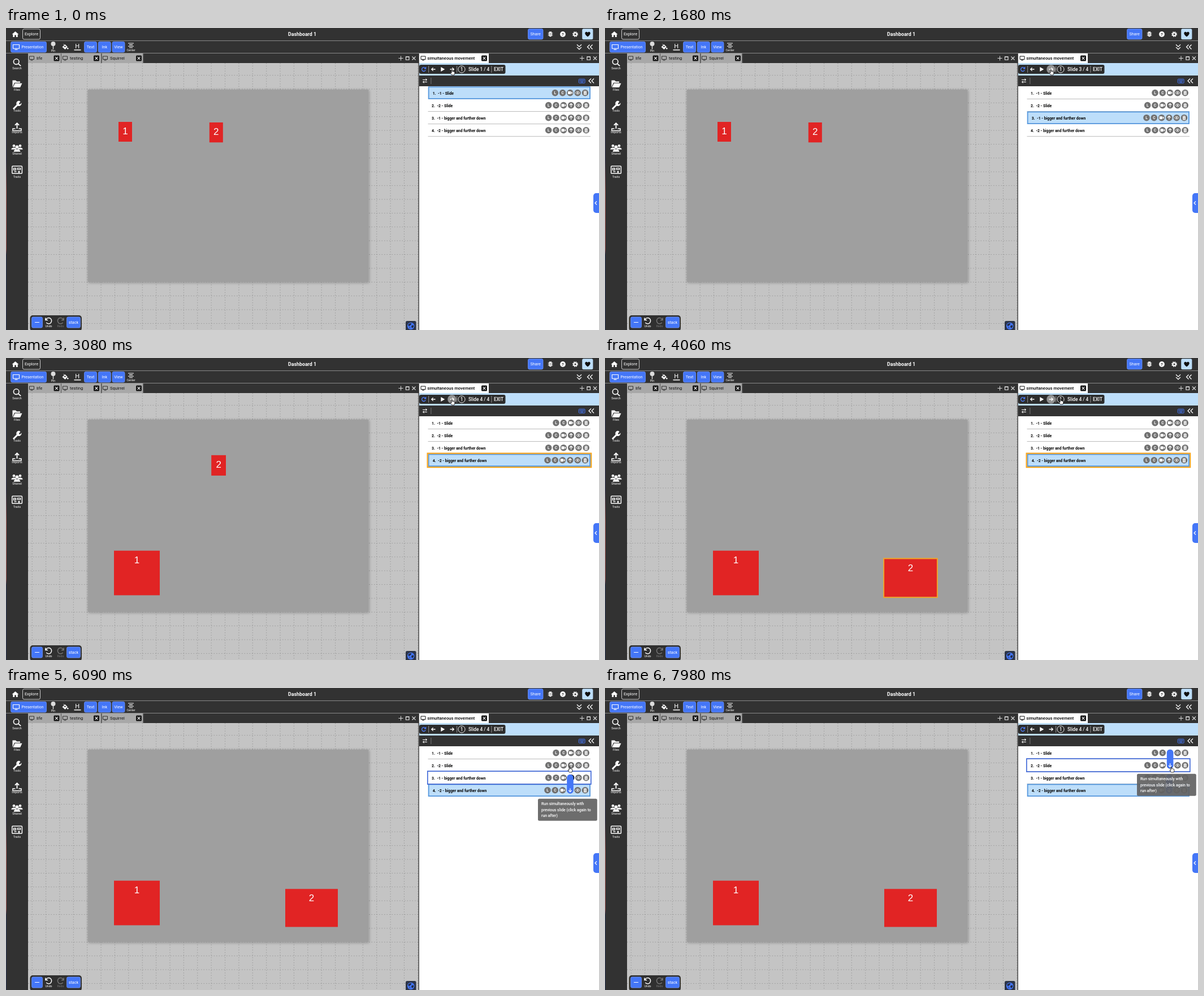
An HTML page that plays this animation: 1049 px wide and 534 px high, repeating every 8000 ms.

```html
<!DOCTYPE html>
<html lang="en">
<head>
<meta charset="utf-8">
<title>Dashboard</title>
<style>
  html, body { margin: 0; width: 100%; height: 100%; overflow: hidden; background: #fff; }
  svg { display: block; width: 100%; height: 100%; font-family: Roboto, sans-serif; }
</style>
</head>
<body>
<svg id="stage" viewBox="0 0 1049 534">
  <defs>
    <filter id="shadow" x="-5%" y="-5%" width="110%" height="112%">
      <feDropShadow dx="1" dy="1" stdDeviation="2.4" flood-opacity=".28"/>
    </filter>
    <linearGradient id="edge" x2="0" y2="1">
      <stop offset="0" stop-color="#27304a"/><stop offset=".41" stop-color="#3a3a55"/>
      <stop offset=".52" stop-color="#b06a68"/><stop offset=".72" stop-color="#a05a5a"/>
      <stop offset=".74" stop-color="#2a3550"/><stop offset="1" stop-color="#27304a"/>
    </linearGradient>
  </defs>
  <g id="fixed"></g>
  <g id="live"></g>
</svg>
<script>
const DARK = '#323232', BLUE = '#4476f7', PALE = '#bddefa', ORANGE = '#f7a51f', RED = '#e12424';
const LOOP = 8000, STEP = 70;

// ---- drawing helpers ----
const rect = (x, y, w, h, fill, r = 0, extra = '') =>
  `<rect x="${x}" y="${y}" width="${w}" height="${h}" rx="${r}" fill="${fill}" ${extra}/>`;
const frame = (x, y, w, h, stroke, sw, r = 0) => rect(x, y, w, h, 'none', r, `stroke="${stroke}" stroke-width="${sw}"`);
const circle = (x, y, r, fill, extra = '') => `<circle cx="${x}" cy="${y}" r="${r}" fill="${fill}" ${extra}/>`;
const text = (x, y, s, size, fill = '#fff', weight = 400, anchor = 'start') =>
  `<text x="${x}" y="${y}" font-size="${size}" fill="${fill}" font-weight="${weight}" text-anchor="${anchor}">${s}</text>`;
const mid = (x, y, s, size, fill, weight) => text(x, y, s, size, fill, weight, 'middle');
const solid = (x, y, d, fill = '#fff') => `<path transform="translate(${x} ${y})" d="${d}" fill="${fill}" fill-rule="evenodd"/>`;
const line = (x, y, d, stroke = '#fff', sw = 1.2) =>
  `<path transform="translate(${x} ${y})" d="${d}" fill="none" stroke="${stroke}" stroke-width="${sw}"/>`;
const button = (x, y, w, h, label) =>
  rect(x, y, w, h, BLUE, 2.5, 'stroke="#7397fb" stroke-width=".8"') + (label ? mid(x + w / 2, y + h / 2 + 2.6, label, 7.2) : '');

const ARROW_R = 'M-3.5 0H3.2M.4 -2.9L3.3 0L.4 2.9';
const ARROW_L = 'M3.5 0H-3.2M-.4 -2.9L-3.3 0L-.4 2.9';
const ARROW_U = 'M0 3.3V-2.9M-2.8 -.2L0 -3L2.8 -.2';
const ARROW_D = 'M0 -3.3V2.9M-2.8 .2L0 3L2.8 .2';
const CROSS = 'M-3 -3L3 3M3 -3L-3 3';
const SMALL_CROSS = 'M-2.3 -2.3L2.3 2.3M2.3 -2.3L-2.3 2.3';
const DOUBLE_LEFT = 'M-.5 -4L-4.5 0L-.5 4M4.5 -4L.5 0L4.5 4';
const MONITOR = 'M-4 -3.5H4V2H-4ZM-2 3.6H2';

const gear = (x, y) => circle(x, y, 2.6, 'none', 'stroke="#fff" stroke-width="2"') +
  circle(x, y, 4.2, 'none', 'stroke="#fff" stroke-width="1.4" stroke-dasharray="1.9 1.4"');
const tabTools = (x, y = 53.5) => line(x, y, 'M-4 0H4M0 -4V4', '#ddd', 1) +
  line(x + 11.7, y, 'M-2.8 -2.8H2.8V2.8H-2.8ZM-2.8 -2.2H2.8', '#eee', 1.1) + line(x + 23, y, CROSS, '#ddd', 1.1);
const closeBox = x => rect(x - 5, 48.5, 10, 10, '#161616', 1.5) + line(x, 53.5, SMALL_CROSS, '#fff', 1.1);

function header() {
  return rect(0, 0, 1049, 45, DARK) + rect(0, 22, 1049, 1, '#8a8a8a') + rect(0, 44, 1049, 1, '#8a8a8a') +
    solid(16.5, 11, 'M-6 .3L0 -5L6 .3H4.2V5H1.3V1.5H-1.3V5H-4.2V.3Z') +
    frame(29.5, 1.8, 31, 18.2, '#ddd', .9, 2.5) + mid(45, 13.4, 'Explore', 7.3) +
    mid(524, 14, 'Dashboard 1', 8.8, '#fff', 700) +
    button(923.5, 1.5, 26.5, 18.5, 'Share') +
    solid(963, 11, 'M-2.4 -2.4A2.4 2.4 0 0 1 2.4 -2.4V2A2.4 2.4 0 0 1 -2.4 2Z') +
    line(963, 11, 'M-4.2 -2.3H4.2M-4.2 0H4.2M-4.2 2.3H4.2M-2.3 -4.6L-1 -3.5M2.3 -4.6L1 -3.5', '#fff', .9) +
    line(963, 11, 'M-1.2 -1.2H1.2M-1.2 1.2H1.2', DARK, .9) +
    circle(985, 11, 4.9, '#fff') + mid(985, 13.8, '?', 7.8, DARK, 700) + gear(1007, 11) +
    rect(1019.2, 1.2, 19.2, 19, PALE, 2.5) +
    solid(1029, 11, 'M0 4.5C-7 -.5 -4.8 -4.2 -2.3 -4.2C-1 -4.2 -.3 -3.3 0 -2.6C.3 -3.3 1 -4.2 2.3 -4.2C4.8 -4.2 7 -.5 0 4.5Z', '#111') +
    button(8.5, 24.3, 63, 18.6) + line(18, 33.5, 'M-5.5 -4H5.5V2.8H-5.5ZM-2.5 4.6H2.5', '#fff', 1.1) + text(27.5, 36, 'Presentation', 6.9) +
    circle(83.5, 28, 4, '#ddd') + rect(82.8, 31, 1.4, 6.5, '#ddd') + mid(83.5, 42, 'Pin', 5.2) +
    solid(104.5, 33.5, 'M-5 0L0 -4.6L4.4 0L0 4.5ZM-2.8 0H2.2L0 -2.4Z') + line(104.5, 33.5, 'M-2.8 -5L0 -2.2', '#fff', 1) + circle(109.2, 36.3, 1.3, '#fff') +
    mid(126.3, 36.2, 'H', 11) + rect(120.5, 38, 12, 1.5, '#fff') +
    button(138.5, 24.3, 22, 18.6, 'Text') + button(163.3, 24.3, 22, 18.6, 'Ink') + button(188, 24.3, 22, 18.6, 'View') +
    line(221, 31, 'M-5 -4H5M-3 -1.4H3M-5 1.2H5M-3 3.8H3', '#fff', 1.1) + mid(221, 40.8, 'Center', 5.2) +
    line(1014, 33.5, 'M-4 -4.3L0 -.4L4 -4.3M-4 .4L0 4.3L4 .4', '#fff', 1.3) + line(1033, 33.5, DOUBLE_LEFT, '#fff', 1.3);
}

function sidebar() {
  const person = (x, y, r) => circle(x, y - r, r, '#fff') + solid(x, y, `M${-2 * r} ${1.9 * r}C${-2 * r} 0 ${2 * r} 0 ${2 * r} ${1.9 * r}Z`);
  const labels = ['Search', 'Files', 'Tools', 'Imports', 'Shared', 'Traits'];
  return rect(0, 45, 39, 489, DARK) + rect(0, 23, 1, 511, 'url(#edge)') +
    circle(18.2, 59.6, 4.8, 'none', 'stroke="#fff" stroke-width="1.6"') + line(18.2, 59.6, 'M3.5 3.5L8 7.6', '#fff', 1.8) +
    solid(19.5, 100, 'M-8 5V-7.4H-2.5L-.5 -5.4H5.5V-3.2H-4.6ZM-3.6 -2.2H9L5.6 5H-7Z') +
    line(18.5, 137.3, 'M-5.5 6L2.5 -2', '#fff', 3) + solid(22.3, 133.2, 'M3.3 -3L.8 -.2L1.2 1.6L2.8 1.8L5 -1A4.6 4.6 0 1 1 1 -4.4Z') +
    line(19.5, 173.5, 'M0 4.5V-5M-3.6 -1.6L0 -5.2L3.6 -1.6', '#fff', 1.9) + line(19.5, 178, 'M-3 0H-7.5V3.4H7.5V0H3', '#fff', 1.5) +
    person(14, 210.5, 2.3) + person(25, 210.5, 2.3) + person(19.5, 213.2, 2.9) +
    frame(10.8, 244.3, 17.6, 13, '#fff', 1.5, 1) + line(19.5, 251, 'M-6 -3H-2V0H-6ZM1 -3.4H6V-.6H1ZM-5 3H-1M2 2L5 4.5M5 2L2 4.5', '#fff', 1.3) +
    labels.map((s, i) => mid(19.5, i < 5 ? 72.8 + 37.8 * i : 265, s, 5.3)).join('');
}

function canvasPane() {
  let grid = '';
  for (let x = 46.2; x < 730; x += 24.38) grid += `M${x} 62V534`;
  for (let y = 83.6; y < 534; y += 24.38) grid += `M39 ${y}H730`;
  const tab = (x, w, s, tx, cx) => rect(x, 45, w, 17, '#a8a8a8') + rect(x + w, 45, 1, 17, '#555') +
    line(tx - 8.5, 53.5, MONITOR, '#222', .9) + text(tx, 56.1, s, 7.6, '#111') + closeBox(cx);
  return rect(39, 45, 691, 489, '#c4c4c4') +
    `<path d="${grid}" fill="none" stroke="#8a8a8a" stroke-width=".7" stroke-dasharray="1.6 2.9"/>` +
    rect(39, 45, 691, 17, DARK) +
    tab(39, 58, 'life', 54, 89.5) + tab(98, 70, 'testing', 113, 160) + tab(169.5, 73, 'Squirrel', 184, 235) + tabTools(698.5) +
    rect(144.5, 109, 497, 340.4, '#9f9f9f', 0, 'filter="url(#shadow)"') +
    rect(42.5, 508, 91.5, 28, '#303030', 5) +
    button(45.5, 511, 19, 19) + rect(51, 520, 8, 1, '#fff') +
    line(75.5, 517.5, 'M-5.5 -5V-1H-1.5M-5 -1.5A5.2 5.2 0 1 1 -4.2 3.4', '#fff', 1.5) + mid(75.5, 529.3, 'Undo', 5.2) +
    line(96.5, 517.5, 'M5.5 -5V-1H1.5M5 -1.5A5.2 5.2 0 1 0 4.2 3.4', '#777', 1.5) + mid(96.5, 529.3, 'Redo', 5.2, '#777') +
    button(107.5, 511, 24, 19, 'stack') +
    rect(707, 518, 18.5, 18, '#2d3548', 2.5) + circle(716.2, 527, 6.2, BLUE) +
    solid(716.2, 527, 'M-5 -2C-3 -5 0 -5.5 1 -4.5L0 -2L-2 -1L-3 1ZM1.5 -1L4.8 -1.5L5 1L2.5 4L.8 1.5ZM-3 2L-1 2.5L-1.5 4.6Z', '#232c44');
}

function sidePane() {
  return rect(730, 45, 319, 489, '#fff') + rect(729.5, 45, 1.3, 489, '#333') + rect(731, 45, 318, 17, DARK) +
    rect(731, 45, 123, 17, '#fff') + line(738, 53.5, MONITOR, '#111', 1) + text(745.3, 56.1, 'simultaneous movement', 7.6, '#000', 500) +
    closeBox(846) + tabTools(1019) +
    rect(731, 62, 318, 22, PALE) + rect(731, 65, 152.5, 16, '#2c2c2c', 3) +
    line(739, 73, 'M3 -1.6A3.4 3.4 0 1 0 3.2 1.3M3.6 -4V-1.2H.8', '#4d7dfa', 1.3) +
    rect(747.3, 67, .8, 12, '#aaa') + line(756, 73, ARROW_L, '#fff', 1.3) + solid(772.5, 73, 'M-3.2 -4L3.8 0L-3.2 4Z') +
    rect(797.3, 67, .8, 12, '#aaa') + rect(858.5, 67, .8, 12, '#aaa') +
    text(863, 75.9, 'EXIT', 8.2, '#fff', 500) +
    rect(731, 84, 318, 19, DARK) + line(741, 93.5, 'M-4 -2H3.4M1.4 -4L3.6 -2L1.4 0M4 2H-3.4M-1.4 0L-3.6 2L-1.4 4', '#fff', 1) +
    rect(751.5, 88, .8, 11, '#888') +
    frame(1013.3, 90.3, 10.8, 7, BLUE, 1, 1) + line(1018.7, 93.8, 'M-4 -1.5H4M-4 .2H4', BLUE, .9) + rect(1016.2, 95.2, 5, .9, BLUE) +
    line(1035.5, 93.5, DOUBLE_LEFT, '#fff', 1.3) +
    solid(1039, 292, 'M10 0H5A5 5 0 0 0 0 5V30A5 5 0 0 0 5 35H10Z', BLUE) + line(1043.5, 309.5, 'M1.5 -3L-1.5 0L1.5 3');
}

// ---- timeline ----
const PICK = [0, 490, 1680, 2870];                                 // slide selected
const GLOW = [null, [770, 1540], [1960, 2730], [3080, 5390]];      // orange highlight per row
const JOIN = [null, 7070, null, 5390];                             // row grouped with the previous one
const MOVE = 600, MOVE_1 = 1935, MOVE_2 = 3055;
const TITLES = ['-1 - Slide', '-2 - Slide', '-1 - bigger and further down', '-2 - bigger and further down'];
const POINTER = [[0, 790, 78], [3990, 790, 78], [4060, 807, 77], [4200, 905, 170], [4340, 985, 285], [4480, 985, 285],
  [4900, 998, 190], [5040, 998, 186], [5880, 998, 186], [5950, 998, 173], [6020, 998, 157], [6090, 998, 144],
  [7700, 998, 144], [7910, 1003, 144]];

const within = (t, span) => !!span && t >= span[0] && t < span[1];
const clamp = v => Math.max(0, Math.min(1, v));

// Same curve as CSS "ease".
function ease(p) {
  if (p <= 0 || p >= 1) return clamp(p);
  let lo = 0, hi = 1;
  for (let i = 0; i < 24; i++) {
    const s = (lo + hi) / 2, q = 1 - s;
    if (.75 * s * q * q + .75 * s * s * q + s ** 3 < p) lo = s; else hi = s;
  }
  return .3 * lo * (1 - lo) ** 2 + 3 * lo * lo * (1 - lo) + lo ** 3;
}

function pointerAt(t) {
  const i = POINTER.findIndex(k => k[0] > t);
  if (i < 0) return POINTER[POINTER.length - 1].slice(1);
  const [ta, xa, ya] = POINTER[i - 1], [tb, xb, yb] = POINTER[i], p = (t - ta) / (tb - ta);
  return [xa + (xb - xa) * p, ya + (yb - ya) * p];
}

function box(label, from, to, p, glow) {
  const [x, y, w, h] = from.map((v, i) => v + (to[i] - v) * p);
  return rect(x, y, w, h, RED) + (glow ? frame(x - .8, y - .8, w + 1.6, h + 1.6, ORANGE, 1.8) : '') +
    `<text x="${x + w / 2}" y="${y + 22}" font-family="Liberation Sans, Arial, sans-serif" font-size="17" fill="#fff" text-anchor="middle">${label}</text>`;
}

const GLYPHS = {
  L: (x, y) => mid(x, y + 2.4, 'L', 6.6, '#fff', 700),
  C: (x, y) => mid(x, y + 2.4, 'C', 6.6, '#fff', 700),
  cam: (x, y) => solid(x, y, 'M-3.8 -2.5H1.4V2.5H-3.8ZM1.9 -.6L4 -2.2V2.2L1.9 .6Z'),
  up: (x, y) => line(x, y, ARROW_U, '#fff', 1.2),
  eye: (x, y) => line(x, y, 'M-3.8 0Q0 -4.8 3.8 0Q0 4.8 -3.8 0Z', '#fff', .9) + circle(x, y, 1.2, '#fff'),
  bin: (x, y) => solid(x, y, 'M-2.9 -3H-1L-.6 -3.7H.6L1 -3H2.9V-2.1H-2.9ZM-2.5 -1.6H2.5V3.7H-2.5Z') +
    line(x, y, 'M-1.2 -.8V2.9M0 -.8V2.9M1.2 -.8V2.9', '#8a8a8a', .5)
};

function row(i, t, current, hoverRow, hoverArrow) {
  const y = 114.6 + 22.05 * i, on = i === current, shift = on ? -1.7 : 0;
  let out = on ? rect(747.6, y - 10.3, 285.4, 20.7, PALE, 0, 'stroke="#5597dd" stroke-width="1.8"')
               : rect(746.5, y + 10.5, 287.5, .9, '#b4b4b4');
  if (within(t, GLOW[i])) out += frame(745.6, y - 12.2, 289.6, 24.6, ORANGE, 2.2);
  else if (hoverRow === i) out += frame(745.8, y - 11.6, 289, 23, '#4169d8', 1.7);
  out += text(753 - shift, y + 2.9, i + 1 + '.', 6.8, '#000', 700) + text(762.4 - shift, y + 2.9, TITLES[i], 6.8, '#000', 700);
  const keys = Object.keys(GLYPHS).filter(k => i || k !== 'up');
  keys.forEach((k, n) => {
    const x = 1026.2 - 13.3 * (keys.length - 1 - n) + shift;
    out += circle(x, y, 5.8, k === 'up' && hoverArrow === i ? '#000' : '#717171') + GLYPHS[k](x, y);
  });
  return out;
}

function pill(i, t, current) {
  if (!JOIN[i] || t < JOIN[i]) return '';
  const x = i === current ? 998 : 999.6, y = 114.6 + 22.05 * i;
  return rect(x - 5.8, y - 28, 11.6, 34, BLUE, 5.8) + line(x, y, ARROW_D, '#fff', 1.2);
}

const LOOSE = ['Not grouped with previous', 'slide (click to group)'];
const JOINED = ['Run simultaneously with', 'previous slide (click again to', 'run after)'];
function tooltip(t) {
  if (t < 5040 || within(t, [6160, 6230])) return '';
  const onLast = t < 6160, top = onLast ? 196 : 152;
  const lines = t >= JOIN[onLast ? 3 : 1] ? JOINED : LOOSE;
  return `<g opacity="${clamp((t - 4970) / 165)}">` +
    rect(941, top - .2, 104.8, lines.length * 10.4 + 7.8, 'rgba(97,97,97,.92)', 2.5) +
    lines.map((s, i) => text(947, top + 11.3 + 10.4 * i, s, 6.9, '#fff', 500)).join('') + '</g>';
}

const hand = (x, y) => `<path transform="translate(${x} ${y})" fill="#fff" stroke="#000" stroke-width=".8" stroke-linejoin="round"
  d="M-2 -4.2Q-1.2 -5 -.5 -4.2V-1.2Q.4 -1.8 1 -1Q1.9 -1.5 2.4 -.7Q3.4 -1 3.8 0V2Q3.8 3.6 3 5H-1.6Q-2.8 3 -4 1.5Q-4 .2 -2 1.4Z"/>`;

const live = document.getElementById('live');
document.getElementById('fixed').innerHTML = canvasPane() + sidePane() + sidebar() + header();

function draw(t) {
  const current = PICK.filter(v => v <= t).length - 1;
  const [px, py] = pointerAt(t);
  const [hx, hy] = pointerAt(Math.max(0, t - STEP));   // hover trails the pointer by one step
  const under = Math.floor((hy - 4 - 103.6) / 22.05);
  const hoverRow = hx > 746 && under >= 0 && under < 4 ? under : -1;
  const hoverArrow = Math.abs(hx - 999) < 6 ? hoverRow : -1;
  const next = t >= 490 && t < 4130;
  let out = box(1, [199, 166, 24, 35], [191, 340.7, 81, 78.8], ease((t - MOVE_1) / MOVE), within(t, [2030, 2730])) +
    box(2, [359.8, 167, 24, 35.3], [494, 355.3, 93, 67.2], ease((t - MOVE_2) / MOVE), within(t, [840, 1540]) || within(t, [3150, 5390])) +
    (next ? circle(789, 73, 7.8, '#929292') : '') + line(789, 73, ARROW_R, '#fff', 1.3) +
    circle(806, 73, 6.1, 'none', 'stroke="#fff" stroke-width=".9"') + mid(806, 75.9, '1', 8.2, '#fff', 500) +
    text(818, 75.9, `Slide ${current + 1} / 4`, 8.3, '#fff', 500);
  const order = [0, 1, 2, 3].sort((a, b) => (a === hoverRow) - (b === hoverRow));
  for (const i of order) out += row(i, t, current, hoverRow, hoverArrow);
  for (const i of [1, 3]) out += pill(i, t, current);
  live.innerHTML = out + tooltip(t) + hand(px, py);
}

// The picture advances in fixed steps.
let shown = -1;
const start = performance.now();
function tick() {
  const t = Math.floor(((performance.now() - start) % LOOP) / STEP) * STEP;
  if (t !== shown) draw(shown = t);
  requestAnimationFrame(tick);
}
tick();
</script>
</body>
</html>
```
